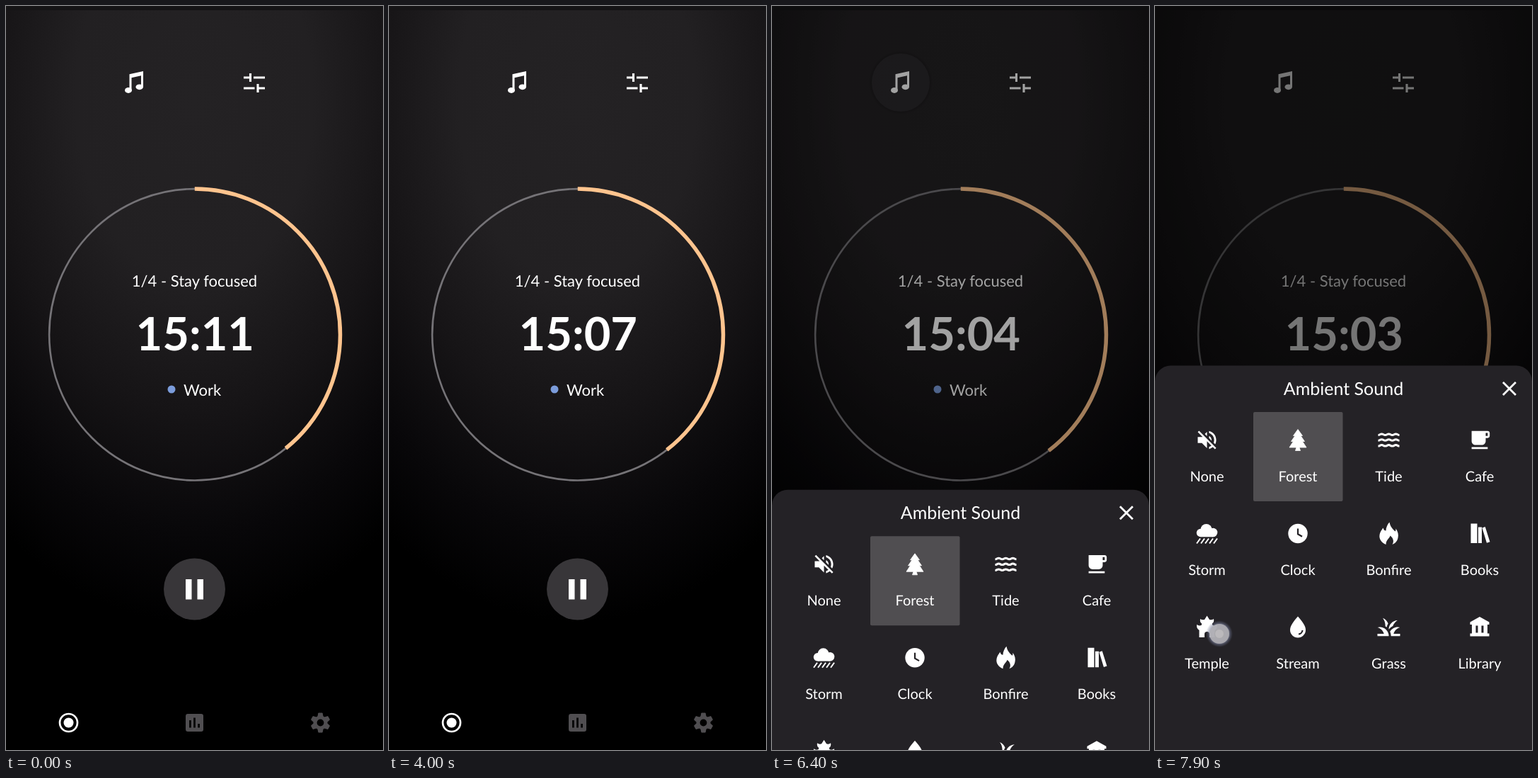
An HTML page for the animation above (8 s loop, 533 by 1050 pixels).

```html
<!DOCTYPE html>
<html lang="en">
<head>
<meta charset="utf-8">
<title>Focus timer</title>
<style>
  html, body { margin: 0; width: 100%; height: 100%; overflow: hidden; background: #000; }
  svg { display: block; width: 533px; height: 1050px; }
  text { font-family: Lato, sans-serif; fill: #fff; text-anchor: middle; text-rendering: geometricPrecision; font-kerning: normal; }
  .cut { fill: #242226; }
  .cutline { fill: none; stroke: #242226; stroke-width: 2.2; }
  .line { fill: none; stroke: #fff; }
</style>
</head>
<body>
<svg viewBox="0 0 533 1050" fill="#fff">
  <defs>
    <radialGradient id="glow" gradientUnits="userSpaceOnUse" cx="0" cy="0" r="1"
      gradientTransform="translate(266 130) scale(480 740)">
      <stop offset="0" stop-color="#242224"/>
      <stop offset=".35" stop-color="#222022"/>
      <stop offset=".6" stop-color="#161416"/>
      <stop offset=".83" stop-color="#080709"/>
      <stop offset="1" stop-color="#000"/>
    </radialGradient>
    <radialGradient id="halo">
      <stop offset=".68" stop-color="#8b90ac" stop-opacity=".75"/>
      <stop offset="1" stop-color="#5a617c" stop-opacity="0"/>
    </radialGradient>
    <radialGradient id="shade">
      <stop offset=".88" stop-color="#000" stop-opacity=".4"/>
      <stop offset="1" stop-color="#000" stop-opacity="0"/>
    </radialGradient>
  </defs>

  <rect width="533" height="1050" fill="url(#glow)"/>
  <rect width="533" height="6" fill="#151416"/>

  <g id="ripple" transform="translate(182 108)">
    <circle r="45" fill="url(#shade)"/>
    <circle r="41" fill="#343236"/>
  </g>

  <!-- music and tuning buttons -->
  <path d="M174.500 96.300L194 92V114H191V98.300L177.500 101.200V119H174.500Z"/>
  <ellipse cx="173" cy="119" rx="5" ry="3.900"/>
  <ellipse cx="188.700" cy="114.300" rx="5.200" ry="3.900"/>
  <path class="line" stroke-width="3.100"
    d="M336 101H346M345.500 95V107M350 101H366M336 116H351.500M356 110V122M356 116H366"/>

  <!-- timer -->
  <g fill="none" transform="translate(266.800 463.800) rotate(-90)">
    <circle r="205.700" stroke="#757377" stroke-width="2.600"/>
    <circle id="arc" r="205.700" stroke="#ffc48e" stroke-width="5.500" pathLength="1500"/>
  </g>
  <text x="266.500" y="395.500" font-size="22">1/4 - Stay focused</text>
  <text id="clock" x="267.300" y="485.500" font-size="65" font-weight="700"></text>
  <circle cx="234" cy="541" r="5.500" fill="#7b9cdb"/>
  <text x="277.500" y="550" font-size="22">Work</text>

  <circle cx="266.500" cy="823" r="43.500" fill="#383639"/>
  <path d="M254 809h8.500v28.500h-8.500zM270.500 809h8.500v28.500h-8.500z"/>

  <!-- bottom navigation -->
  <circle class="line" cx="88.500" cy="1011.500" r="12.500" stroke-width="2.700"/>
  <circle cx="88.500" cy="1011.500" r="7"/>
  <rect x="254" y="999" width="25" height="25" rx="3" fill="#504e51"/>
  <path d="M259 1008h2.800v10.500h-2.800zM265.100 1004.500h2.800v14h-2.800zM271.200 1013h2.800v5.500h-2.800z" fill="#060606"/>
  <g id="gear" transform="translate(444.500 1011.500)" fill="#504e51"></g>

  <rect id="dim" width="533" height="1050" fill="#000"/>

  <g id="sheet">
    <rect width="533" height="640" rx="22" fill="#242226"/>
    <text x="266.500" y="41" font-size="25">Ambient Sound</text>
    <path class="line" stroke-width="2.800" d="M492 23.500l18 18m0-18l-18 18"/>
    <rect x="139" y="65.500" width="126.500" height="126" rx="2" fill="#504e51"/>
  </g>

  <g id="touch">
    <circle r="19" fill="url(#halo)"/>
    <circle r="14" fill="#b2b1b4" fill-opacity=".88"/>
    <circle r="6.500" fill="#bbb9bc" stroke="#aaa9ac"/>
  </g>
</svg>
<script>
const $ = id => document.getElementById(id);
const path = (d, extra = "") => `<path d="${d}" ${extra}/>`;
const circle = (x, y, r) => `<circle cx="${x}" cy="${y}" r="${r}"/>`;
const grid24 = (d, s) => path(d, `transform="scale(${s}) translate(-12 -12)"`);

const wave = y => `M-15 ${y}` + "c2.500 0 2.500-1.500 5-1.500s2.500 1.500 5 1.500".repeat(3);
const drops = [-12, -6, 0, 6, 12].map(x => `M${x - 2.5} 14l5-7`).join("");

// Each icon is drawn around its own centre.
const sounds = [
  ["None", grid24("M16.5 12c0-1.77-1.02-3.29-2.5-4.03v2.21l2.45 2.45c.03-.2.05-.41.05-.63zm2.500 0c0 .94-.2 1.820-.54 2.640l1.510 1.510C20.630 14.910 21 13.500 21 12c0-4.280-2.990-7.860-7-8.770v2.060c2.890.86 5 3.540 5 6.710zM4.270 3L3 4.270 7.730 9H3v6h4l5 5v-6.730l4.250 4.250c-.67.52-1.420.93-2.250 1.180v2.060c1.380-.31 2.630-.95 3.690-1.810L19.730 21 21 19.730l-9-9zM12 4L9.910 6.090 12 8.180z", 1.45)],
  ["Forest", path("M0-15L6.500-6H4L9.500 2H6.500L12 10.500H2L3.500 15H-3.500L-2 10.500H-12L-6.500 2H-9.500L-4-6H-6.500Z", 'stroke="#fff" stroke-width=".8" stroke-linejoin="round"')],
  ["Tide", path(wave(-7) + wave(0.8) + wave(8.6), 'class="line" stroke-width="3"')],
  ["Cafe", grid24("M20 3H4v10c0 2.210 1.790 4 4 4h6c2.210 0 4-1.790 4-4v-3h2c1.110 0 2-.89 2-2V5c0-1.110-.89-2-2-2zm0 5h-2V5h2zM4 19h16v2H4z", 1.42)],
  ["Storm", circle(-9, -1, 5.8) + circle(-1, -5.5, 8) + circle(8.5, -1.5, 6.3) + path("M-9 0H9V4.800H-9Z") + path(drops, 'class="line" stroke-width="2"')],
  ["Clock", circle(0, 0, 13.7) + path("M0-7V.8L6 4.300", 'class="cutline"')],
  ["Bonfire", path("M1-16C2-10 5-7 9-3C10-4 10-5 10-7C13-3 14 2 13 6C12 11 9 14 5 15.500C8 11 6 6 2 3C1 7-4 9-4 15.500C-10 13-14 8-13 2C-12-3-10-5-8-8C-7-5-6-4-4-4C-4-8-2-13 1-16Z")],
  ["Books", path("M-12.500-14h9v27.500h-9zM-2-9h5v22.500h-5zM3.500-8L7.800-9.500L14.500 11.800L10 13.300Z")],
  ["Temple", path("M0-16L3.500-10.500Q7-9.500 9.500-11.500Q10.500-7 7.500-5V-3Q11-1 14.500-3.500Q15 2 11 4.500V14.500H3.500V10A3.500 3.500 0 0 0-3.500 10V14.500H-11V4.500Q-15 2-14.500-3.500Q-11-1-7.500-3V-5Q-10.500-7-9.500-11.500Q-7-9.500-3.500-10.500Z")],
  ["Stream", path("M0-15C6-8 11-2 11 4A11 11 0 0 1-11 4C-11-2-6-8 0-15Z") + path("M6.500 4.500A6 6 0 0 1 1 10", 'class="cutline"')],
  ["Grass", grid24("M12 20H2v-2h5.750C7 15.200 4.800 13 2 12.260Q3 12 4 12a8 8 0 0 1 8 8zM22 12.260Q21 12 20 12c-2.930 0-5.480 1.580-6.880 3.930Q14 18 14 20h8v-2h-5.750c.74-2.810 2.950-5 5.750-5.740zM15.640 11c.78-2.090 2.230-3.840 4.090-5C15.440 6.160 12 9.670 12 14q1.500-2 3.640-3zM11.420 8.850C10.580 6.660 8.880 4.890 6.700 4 8.140 5.860 9 8.180 9 11.300q.6.300 1.180.84.300-1.800 1.240-3.290z", 1.6)],
  ["Library", path("M0-14.500L13.500-7V-3.500H11V9H13.500V13H-13.500V9H-11V-3.500H-13.500V-7Z") + path("M-5.500-2h3v10h-3zM2.500-2h3v10h-3z", 'class="cut"')]
];

$("sheet").insertAdjacentHTML("beforeend", sounds.map(([name, icon], i) => {
  const x = 73.5 + 128.5 * (i % 4), y = 105 + 132 * Math.floor(i / 4);
  return `<g transform="translate(${x} ${y})">${icon}<text y="58.500" font-size="20">${name}</text></g>`;
}).join(""));

$("gear").innerHTML = circle(0, 0, 10) +
  [0, 60, 120, 180, 240, 300].map(a =>
    path("M-4.500-7L-3.200-13.200Q-3-13.900-2.300-13.900H2.300Q3-13.900 3.200-13.200L4.500-7Z", `transform="rotate(${a})"`)).join("") +
  '<circle r="4.900" fill="#000"/>';

const LOOP = 8000;
const taps = [[6150, 6400, 193, 125], [7800, 8000, 91, 886]];
const ramp = (t, from, to) => Math.min(1, Math.max(0, (t - from) / (to - from)));
const easeOut = p => 1 - (1 - p) ** 3;

function draw(t) {
  const left = 911 - Math.floor((t + 600) / 1000);
  $("clock").textContent = `${Math.floor(left / 60)}:${String(left % 60).padStart(2, "0")}`;
  $("arc").setAttribute("stroke-dasharray", `${588.6 + t / 1000} 1500`);

  $("ripple").setAttribute("opacity", ramp(t, 6150, 6300) * (1 - ramp(t, 6320, 6480)));

  const open = easeOut(ramp(t, 6310, 6600));
  $("dim").setAttribute("opacity", 0.54 * open);
  $("sheet").setAttribute("transform", `translate(0 ${1050 - 542.5 * open})`);

  const tap = taps.find(([from, to]) => t >= from && t < to);
  $("touch").setAttribute("visibility", tap ? "visible" : "hidden");
  if (tap) $("touch").setAttribute("transform", `translate(${tap[2]} ${tap[3]})`);
}

const start = performance.now();
function tick() {
  draw((performance.now() - start) % LOOP);
  requestAnimationFrame(tick);
}
tick();
</script>
</body>
</html>
```
